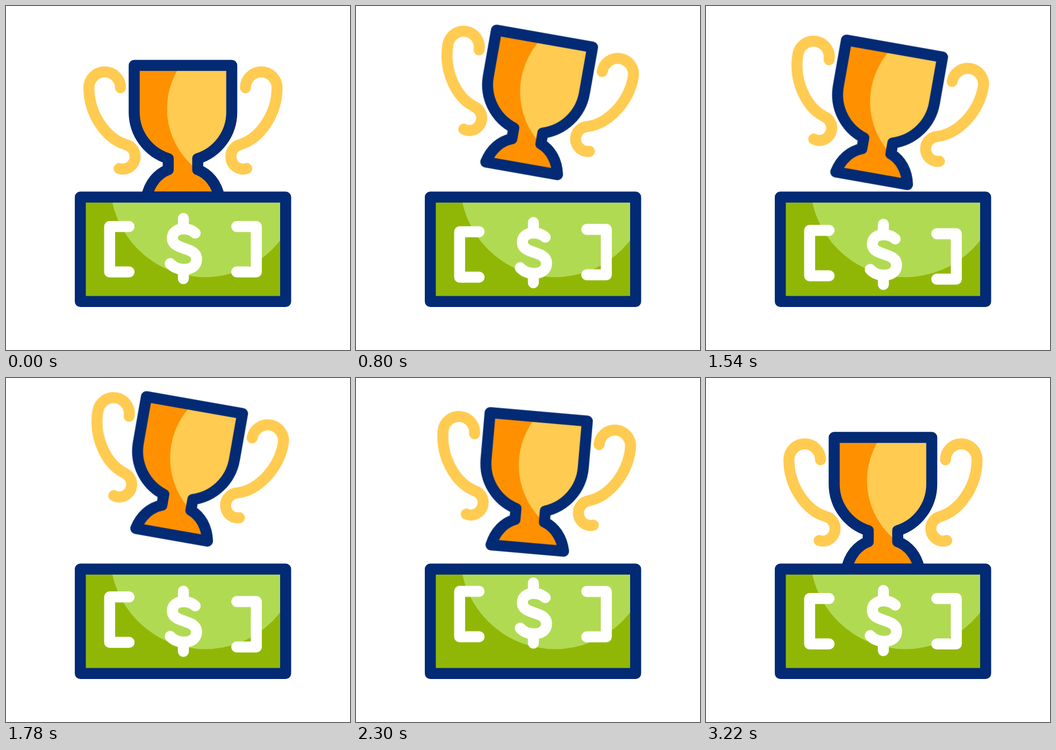
Animation, 640 px wide and 640 px high, one loop 3620 ms. Source, as an HTML page:

```html
<!DOCTYPE html>
<html lang="en">
<head>
<meta charset="utf-8">
<title>Prize money</title>
<style>
  html, body { margin: 0; width: 100%; height: 100%; overflow: hidden; background: #fff; }
  svg { display: block; width: 100vw; height: 100vh; }
  .line { fill: none; stroke-width: 20.5; stroke-linecap: round; stroke-linejoin: round; }
  .navy { stroke: #032a74; }
  .gold { stroke: #ffcb51; }
  .white { stroke: #fff; }

  .trophy, .mark { animation: 3620ms cubic-bezier(.3333, 0, .6667, 1) infinite; }
  .trophy { animation-name: hop; transform-origin: 329.25px 234px; }
  .mark { animation-name: bob; }
  .second { animation-delay: 100ms; }
  .third { animation-delay: 200ms; }

  /* keys at 200, 800, 1400, 2000 and 2600 ms */
  @keyframes hop {
    0%, 5.525% { transform: translateY(0) rotate(0deg); }
    22.099% { transform: translateY(-51.6px) rotate(10deg); }
    38.674% { transform: translateY(-25.9px) rotate(10deg); }
    55.249% { transform: translateY(-77.6px) rotate(10deg); }
    71.823%, 100% { transform: translateY(0) rotate(0deg); }
  }

  /* keys at 200, 1200, 2200 and 3000 ms */
  @keyframes bob {
    0%, 5.525% { transform: translateY(0); }
    33.149% { transform: translateY(15px); }
    60.773% { transform: translateY(-14px); }
    82.873%, 100% { transform: translateY(0); }
  }
</style>
</head>
<body>
<svg viewBox="0 0 640 640">
  <defs>
    <path id="cup" d="M238.5 110.5H420V198A90.75 90.75 0 0 1 356.7 284V304.5C376.5 312 391.5 330 397 355.5H261.5C267 330 282 312 301.8 304.5V284A90.75 90.75 0 0 1 238.5 198Z"/>
    <path id="handle" d="M213 152A29.4 29.4 0 0 0 154.2 152C154.2 200 185 246 222 257.5A23.3 23.3 0 0 1 240.2 280.3A23.2 23.2 0 0 1 217 303.5Q213.5 303.5 210.5 302.3"/>
    <clipPath id="cupClip"><use href="#cup"/></clipPath>
    <clipPath id="billClip"><rect x="138.25" y="355.5" width="382" height="194.25"/></clipPath>
  </defs>

  <g class="trophy">
    <use href="#handle" class="line gold"/>
    <use href="#handle" class="line gold" transform="translate(658.5 0) scale(-1 1)"/>
    <g clip-path="url(#cupClip)">
      <rect x="220" y="90" width="220" height="280" fill="#ff9100"/>
      <circle cx="441.5" cy="191" r="142" fill="#ffcb51"/>
    </g>
    <use href="#cup" class="line navy"/>
  </g>

  <g clip-path="url(#billClip)">
    <rect x="138" y="355" width="383" height="195" fill="#91b706"/>
    <circle cx="370.5" cy="327.9" r="176.6" fill="#b1da53"/>
  </g>
  <rect class="line navy" x="138.25" y="355.5" width="382" height="194.25"/>

  <path class="line white mark" d="M229 410.3H192.8V494.8H229"/>
  <path class="line white mark second" d="M352 422.5C346 417 338 414.7 330 414.7C318 414.7 309.5 421.5 309.5 431.5C309.5 440 315 444.5 322 447.3L340 454C348 457 354.5 462 354.5 471C354.5 483 345 490 331 490C320 490 312 486 305.5 479.3M330 395.3V412M330 492V507.3"/>
  <path class="line white mark third" d="M429.3 410.3H465.7V494.8H429.3"/>
</svg>
</body>
</html>
```
